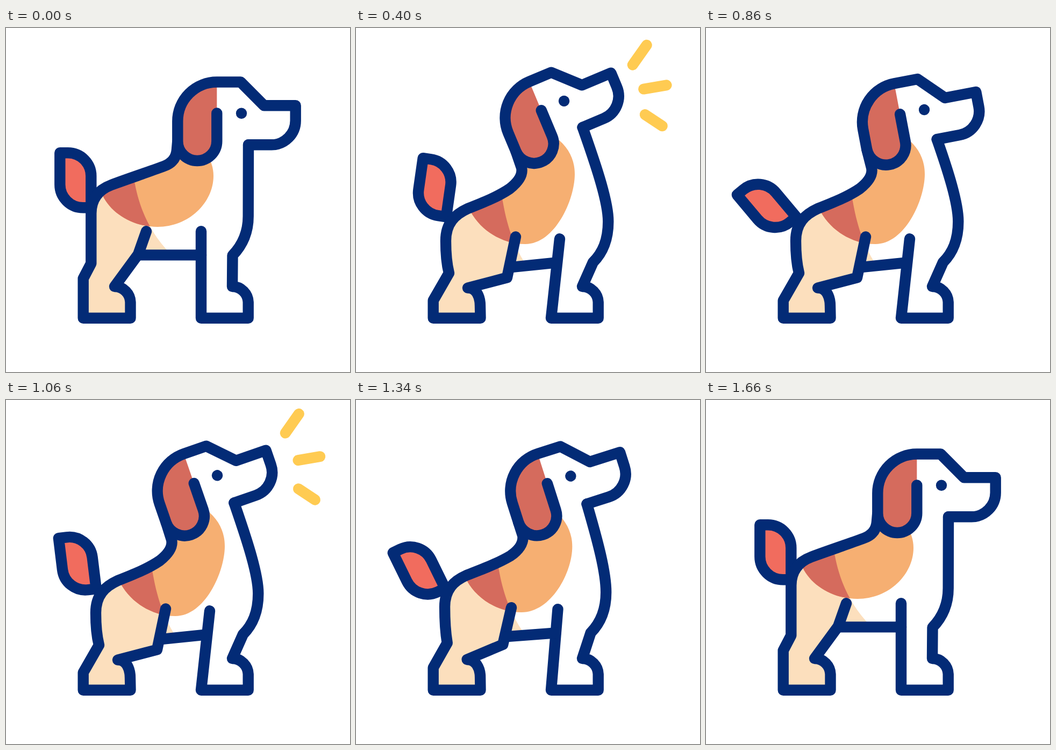
An HTML page that plays this animation: 640 px wide and 640 px high, repeating every 2400 ms.

```html
<!DOCTYPE html>
<html lang="en">
<head>
<meta charset="utf-8">
<title>Barking dog</title>
<style>
  html, body { margin: 0; width: 100%; height: 100%; overflow: hidden; background: #fff; }
  svg { display: block; width: 100%; height: 100%; }
  .line { fill: none; stroke: #032b76; stroke-width: 20.4; stroke-linecap: round; stroke-linejoin: round; }
  .bark { stroke: #ffcb52; stroke-width: 20; stroke-linecap: round; }
</style>
</head>
<body>
<svg viewBox="0 0 640 640">
  <defs><clipPath id="hindClip"><path id="hindShape"/></clipPath></defs>
  <path id="hind" fill="#fcdfbd"/>
  <path id="patch" fill="#f6af72"/>
  <path id="shade" fill="#d56b5d" clip-path="url(#hindClip)"/>
  <g id="tail">
    <path class="line" style="fill:#f16c5e" d="M-58-102H-43A43 43 0 0 1 0-59V0H-15A43 43 0 0 1-58-43Z"/>
  </g>
  <path id="back" class="line"/>
  <path id="front" class="line"/>
  <path id="belly" class="line"/>
  <g id="head">
    <path fill="#d56b5d" d="M392.3 100.5A73 73 0 0 0 319.3 173.5V210.5A36.5 36.5 0 0 0 392.3 210.5Z"/>
    <path class="line" d="M392.3 158.5V210.5A36.5 36.5 0 0 1 319.3 210.5V173.5A73 73 0 0 1 392.3 100.5H436.5L480 144.3H538.7V172A45 45 0 0 1 494 217.3H451"/>
    <circle cx="438" cy="158.8" r="10.2" fill="#032b76"/>
  </g>
  <g id="barks"></g>
</svg>
<script>
const LOOP = 2400, ACTIVE = 1660, STEP = 20;
const el = id => document.getElementById(id);
const ease = x => x * x * (3 - 2 * x);
const clamp = x => Math.min(1, Math.max(0, x));
const mix = (a, b, p) => a + (b - a) * p;

// Keyframe tracks: [time in ms, value]
const CROUCH = [[0, 0], [408, 1], [1200, 1], [1660, 0]];
const HEAD = [[0, 0], [400, -22.7], [800, -10], [1200, -22.7], [1660, 0]];
const TAIL = [[0, 0], [142, -33], [495, 17], [858, -40], [1133, 0], [1400, -30], [1610, 0]];

function track(keys, t) {
  const i = keys.findIndex(k => k[0] > t);
  if (i < 0) return keys[keys.length - 1][1];
  const [t0, v0] = keys[i - 1], [t1, v1] = keys[i];
  return mix(v0, v1, ease((t - t0) / (t1 - t0)));
}

// Each part as [standing, crouching] with matching commands
const NECK = [
  'L318 226C317 242 308 252 294 257',
  'L308 260C311 274 300 288 286 299'];
const SPINE = [
  'C262 269 228 280 196 292C172 301 158.3 318 158.3 345C158.3 375 158.3 410 158.3 438',
  'C264 314 236 325 208 336C184 347 167 363 167 396C167 420 169 440 173 456'];
const HIND_LEG = [
  'L143.7 466L143.7 539.7L231.5 539.7L231.5 511C231.5 494.5 218.5 481 202 481L246 421',
  'L143.7 507L143.7 539.7L231.5 539.7L231 517C231 500 224 483 208 483.5L281 464.5'];
const THIGH = ['L261 378.3', 'L297 388.5'];
const HIND_EDGE = [
  'L250 422L306 420C262 375 245.5 325 238 280',
  'L286 445L316 440C289 398 278 355 271 310'];
const PATCH = [
  'M180 312C196 345 236 370 282 370C340 370 386 325 386 275C386 250 372 225 350 205L330 225L318 230L294 257L196 292Z',
  'M214 343C232 375 270 402 315 402C370 402 407 320 407 272C407 245 396 222 372 204L340 205L308 260L286 299L208 336Z'];
const FRONT = [
  'M363 378.3L363 539.7L450.7 539.7L450.7 511C450.7 494.5 437.5 481 421 481L421.5 423C440 404 450.7 380 450.7 350C450.7 305 450.7 260 ',
  'M379 392.3L363 539.7L450.7 539.7L450.7 511C450.7 494.5 437.5 481 421 481L441 436C459 418 469.3 395 469.3 360C469.3 325 450 265 '];
const BELLY = ['M250 422.4L363 422.4', 'M286 445.4L374 436.4'];

function morph([a, b], p) {
  const target = b.match(/[\d.]+/g);
  let i = 0;
  return a.replace(/[\d.]+/g, n => mix(+n, +target[i++], p).toFixed(2));
}

const RAYS = [[506, 81, 549, 20], [521, 116, 591, 104], [527, 154, 580, 189]];
const rays = RAYS.map(() => {
  const line = document.createElementNS('http://www.w3.org/2000/svg', 'line');
  line.setAttribute('class', 'bark');
  return el('barks').appendChild(line);
});

function drawBarks(t) {
  const time = t - (t < 800 ? 238 : 878);
  const tip = ease(clamp(time / 225));
  const root = ease(clamp((time - 97) / 225));
  el('barks').setAttribute('visibility', tip - root > 0.005 ? 'visible' : 'hidden');
  RAYS.forEach(([x0, y0, x1, y1], i) => {
    const ends = { x1: mix(x0, x1, root), y1: mix(y0, y1, root), x2: mix(x0, x1, tip), y2: mix(y0, y1, tip) };
    for (const name in ends) rays[i].setAttribute(name, ends[name]);
  });
}

function draw(t) {
  const p = track(CROUCH, t);
  const drop = Math.sin(p * Math.PI / 2); // head and tail sink ahead of the body
  const angle = track(HEAD, t);
  const px = 337 - 18 * p, py = 224 + 11 * drop;
  const c = Math.cos(angle * Math.PI / 180), s = Math.sin(angle * Math.PI / 180);
  const onHead = (x, y) =>
    `${px + (x - 337) * c - (y - 224) * s} ${py + (x - 337) * s + (y - 224) * c}`;
  const setPath = (id, d) => el(id).setAttribute('d', d);

  const neck = morph(NECK, p);
  const rump = morph(SPINE, p) + morph(HIND_LEG, p);
  const shoulder = neck.split(' ').slice(-2).join(' ');
  const hind = 'M' + shoulder + rump + morph(HIND_EDGE, p) + 'Z';
  const patch = morph(PATCH, p);
  setPath('hind', hind);
  setPath('hindShape', hind);
  setPath('patch', patch);
  setPath('shade', patch);
  setPath('back', 'M' + onHead(319.3, 211) + neck + rump + morph(THIGH, p));
  setPath('front', morph(FRONT, p) + onHead(451, 217.3));
  setPath('belly', morph(BELLY, p));

  el('head').setAttribute('transform', `translate(${px} ${py}) rotate(${angle}) translate(-337 -224)`);
  el('tail').setAttribute('transform',
    `translate(${158.3 + 9.5 * p} ${334.3 + 17 * drop}) rotate(${track(TAIL, t)})`);
  drawBarks(t);
}

const begin = performance.now();
function tick() {
  const t = (performance.now() - begin) % LOOP;
  draw(Math.min(ACTIVE, Math.floor(t / STEP) * STEP));
  requestAnimationFrame(tick);
}
tick();
</script>
</body>
</html>
```
